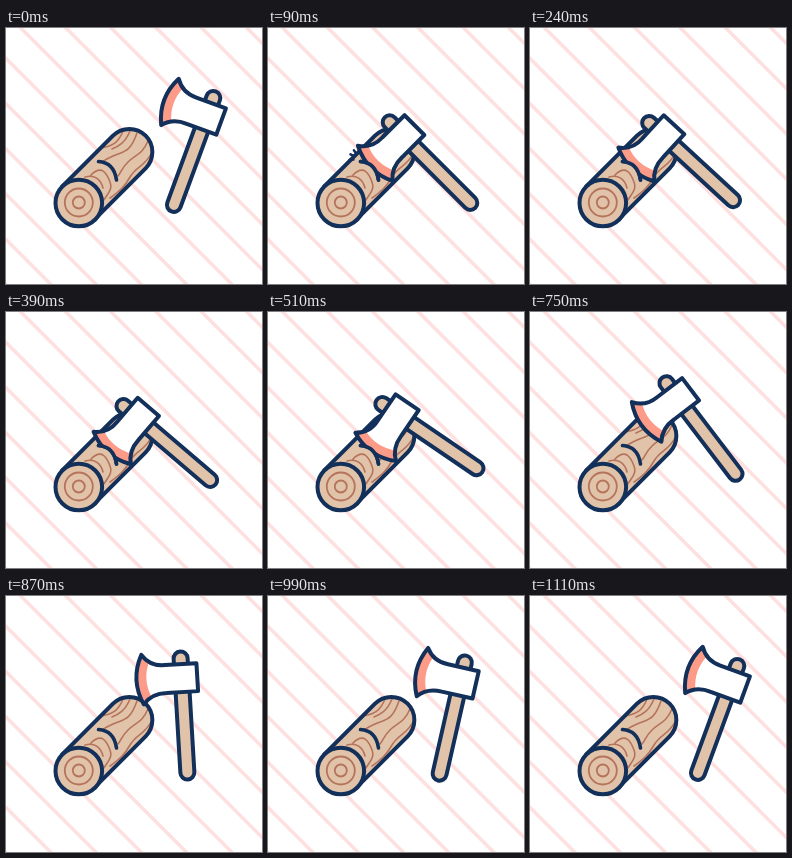
These frames come from a looping animation (256 by 256 pixels, 1.26 s). An HTML page with a canvas:

```html
<!DOCTYPE html>
<html lang="en">
<head>
<meta charset="utf-8">
<title>Axe and log</title>
<style>
  html, body { margin: 0; width: 100%; height: 100%; overflow: hidden; background: #fff; }
  canvas { display: block; width: 100vw; height: 100vh; }
</style>
</head>
<body>
<canvas id="stage"></canvas>
<script>
const SIZE = 256, LOOP = 1260, STEP = 30;
const NAVY = '#12305a', WOOD = '#e1c3a9', GRAIN = '#b5735c';
const EDGE = '#fc9b87', STRIPE = '#ffe0e0', GAP = 45.25;

const canvas = document.getElementById('stage');
const ctx = canvas.getContext('2d');

// time, handle centre x, y, angle in degrees
const KEYS = [
  [0, 187.6, 123.4, 20.2],
  [30, 176.5, 127, -8],
  [60, 163, 134, -42],
  [90, 162, 134.6, -45],
  [390, 160.8, 131, -49.5],
  [630, 163, 117.5, -60.6],
  [750, 171, 116.5, -37.3],
  [870, 178, 119.5, -3.4],
  [1110, 187.6, 123.4, 20.2]
];

const LOG_SHAPE = new Path2D('M56 158.7 L107 107.7 A23 23 0 0 1 139.6 140.3 L88.6 191.3 Z');
const GRAINS = new Path2D(
  'M117 103 C110 121 100 117 90 122 S80 134 69 143' +
  'M131 105 C124 125 118 123 107 128 S99 133 95 134' +
  'M124 103 C119 115 113 118 106 121' +
  'M142 113 C136 127 129 127 122 134 S116 143 112 148' +
  'M146 124 C140 138 130 138 124 149 S112 164 104 170' +
  'M85 147 C96 136 101 146 104 154 S101 166 98 172' +
  'M79 149 C89 146 95 152 97 160');
const CRACK = new Path2D('M92.5 133.5 Q108 134.5 110.5 152');
const HEAD = new Path2D(
  'M-39 -63 Q-31 -51 -16 -51.5 L15.5 -51.5 V-23.5 H-16 Q-31 -24 -39.5 -13.5 Q-51.5 -38.5 -39 -63 Z');
const BLADE = new Path2D(
  'M-39 -63 L-31.5 -56 Q-39.5 -38.5 -31 -19.5 L-39.5 -13.5 Q-51.5 -38.5 -39 -63 Z');

// everything except the slot the blade sinks into
const OUTSIDE = new Path2D('M0 0 H256 V256 H0 Z M92.5 133.5 Q108 134.5 110.5 152 L90 174 L73 152 Z');

function slope(i, c) {
  if (i === 0 || i === KEYS.length - 1) return 0;
  const [p, k, n] = [KEYS[i - 1], KEYS[i], KEYS[i + 1]];
  const a = (k[c] - p[c]) / (k[0] - p[0]);
  const b = (n[c] - k[c]) / (n[0] - k[0]);
  return a * b <= 0 ? 0 : 2 * a * b / (a + b);
}

// monotone cubic interpolation of one channel
function sample(t, c) {
  const last = KEYS.length - 1;
  if (t >= KEYS[last][0]) return KEYS[last][c];
  let i = 0;
  while (t >= KEYS[i + 1][0]) i++;
  const a = KEYS[i], b = KEYS[i + 1], h = b[0] - a[0];
  const u = (t - a[0]) / h, v = 1 - u;
  return v * v * (1 + 2 * u) * a[c] + u * u * (3 - 2 * u) * b[c] +
    h * u * v * (v * slope(i, c) - u * slope(i + 1, c));
}

function stroke(path, color, width) {
  ctx.strokeStyle = color;
  ctx.lineWidth = width;
  ctx.stroke(path);
}

function shape(path, fill) {
  ctx.fillStyle = fill;
  ctx.fill(path);
  stroke(path, NAVY, 4);
}

function circle(x, y, r) {
  const p = new Path2D();
  p.arc(x, y, r, 0, Math.PI * 2);
  return p;
}

function drawStripes() {
  const p = new Path2D();
  for (let x = -121 - GAP * 3; x < SIZE + 10; x += GAP) {
    p.moveTo(x - 10, -10);
    p.lineTo(x + SIZE + 10, SIZE + 10);
  }
  stroke(p, STRIPE, 3.6);
}

function drawLog() {
  ctx.fillStyle = WOOD;
  ctx.fill(LOG_SHAPE);
  ctx.save();
  ctx.clip(LOG_SHAPE);
  stroke(GRAINS, GRAIN, 1.6);
  ctx.restore();
  stroke(LOG_SHAPE, NAVY, 4);
  shape(circle(72.8, 175, 23.3), WOOD);
  for (const r of [14, 6]) stroke(circle(72.8, 174.5, r), GRAIN, 1.8);
  stroke(CRACK, NAVY, 3.6);
}

function drawAxe(t) {
  ctx.save();
  ctx.clip(OUTSIDE, 'evenodd');
  ctx.translate(sample(t, 1), sample(t, 2));
  ctx.rotate(sample(t, 3) * Math.PI / 180);
  const handle = new Path2D();
  handle.arc(0, -57, 7, Math.PI, 0);
  handle.arc(0, 57, 7, 0, Math.PI);
  handle.closePath();
  shape(handle, WOOD);
  ctx.fillStyle = '#fff';
  ctx.fill(HEAD);
  ctx.fillStyle = EDGE;
  ctx.fill(BLADE);
  stroke(HEAD, NAVY, 4);
  ctx.restore();
}

function drawChips(t) {
  const u = (t - 60) / 150;
  if (u < 0 || u >= 1) return;
  const p = new Path2D(), len = 5 * (1 - u);
  for (const angle of [3.05, 3.6, 4.1]) {
    const c = Math.cos(angle), s = Math.sin(angle), d = 3 + 18 * u;
    p.moveTo(92 + c * d, 131 + s * d);
    p.lineTo(92 + c * (d + len), 131 + s * (d + len));
  }
  stroke(p, NAVY, 2.5);
}

function draw(t) {
  const w = Math.round(innerWidth * devicePixelRatio);
  const h = Math.round(innerHeight * devicePixelRatio);
  if (canvas.width !== w || canvas.height !== h) {
    canvas.width = w;
    canvas.height = h;
  }
  ctx.setTransform(w / SIZE, 0, 0, h / SIZE, 0, 0);
  ctx.lineJoin = 'round';
  ctx.lineCap = 'round';
  ctx.fillStyle = '#fff';
  ctx.fillRect(0, 0, SIZE, SIZE);
  drawStripes();
  drawLog();
  drawAxe(t);
  if (t >= 60 && t < 600) stroke(CRACK, NAVY, 3.6);
  drawChips(t);
}

const start = performance.now();
function tick() {
  const t = (performance.now() - start) % LOOP;
  draw(Math.floor(t / STEP) * STEP);
  requestAnimationFrame(tick);
}
tick();
</script>
</body>
</html>
```
